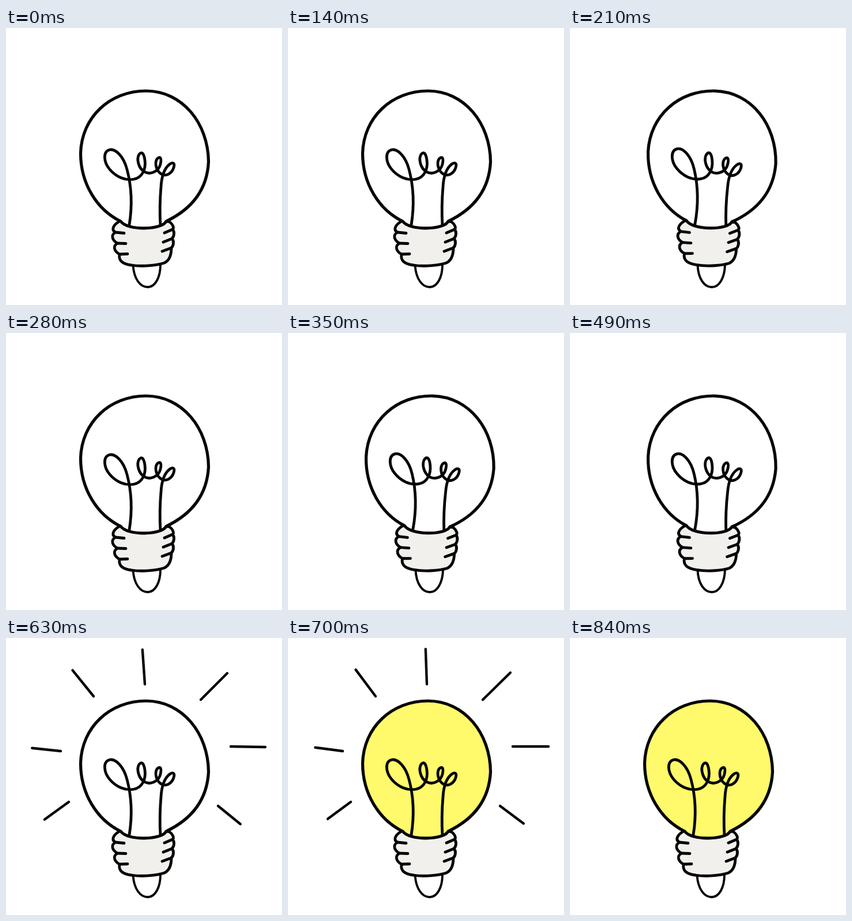
An HTML page for the animation above (1.05 s loop, 479x480 px).

```html
<!DOCTYPE html>
<html lang="en">
<head>
<meta charset="utf-8">
<title>Light bulb</title>
<style>
  html, body { margin: 0; width: 100%; height: 100%; overflow: hidden; background: #fff; }
  svg { display: block; width: 100%; height: 100%; }
  path { fill: none; stroke: #050505; stroke-width: 4.8; stroke-linecap: round; stroke-linejoin: round; }
  #glass { stroke-width: 5.2; }
  #base { fill: #f1f0ec; }
  #tip { stroke-width: 3.9; }
  #rays { stroke-width: 4.4; }
</style>
</head>
<body>
<svg viewBox="0 0 479 480">
  <g id="bulb">
    <path id="tip" d="M220.5 411C222 435 233 449 246 449S268 432 268 410"/>
    <path id="glass"/>
    <path id="filament" d="M214 341C219 310 218 275 210 245C204 222 190 209 180 211C168 214 169 232 180 245S207 265 222 262S243 244 241 229S234 215 231 219C226 227 230 243 240 249S265 249 268 236S266 223 263 226C258 231 259 245 268 252S288 252 291 242S288 233 284 236C275 243 270 258 269 275Q266 310 268 343"/>
    <path id="base"/>
    <path id="notches"/>
  </g>
  <path id="rays"/>
</svg>
<script>
const STEP = 70, LOOP = 1050;
const $ = id => document.getElementById(id);
const setPath = (id, d) => $(id).setAttribute("d", d);
const line = ([x, y], [a, b]) => `M${x} ${y}L${a} ${b}`;

// A rounded bulge from p to q, pushed sideways by d
function bulge([x, y], [a, b], d) {
  const lift = (b - y) / 4;
  return `C${x + d} ${y + lift} ${a + d} ${b - lift} ${a} ${b}`;
}

function buildBulb() {
  const collar = "C272 350 210 352 199 335Z";
  setPath("glass", "M199 335C158 315 129.5 270 129.5 217C131 155 180 109 243 109" +
    "S351 165 351.5 232C349 280 322 314 278 335" + collar);

  const rows = [0, 1, 2];
  const left = rows.map(i => [190 + 3.5 * i, 354 + 19 * i]);
  const right = rows.map(i => [289 - i, 349 + 16 * i]);
  const leftTop = [197, 335], rightTop = [284, 336];

  let d = "M" + leftTop;
  rows.forEach(i => d += bulge(left[i - 1] || leftTop, left[i], -9));
  d += "C195 403 202 409 218 411C238 414 263 411 275 407Q287 401 " + right[2];
  rows.reverse().forEach(i => d += bulge(right[i], right[i - 1] || rightTop, 4));
  setPath("base", d + "L278 335" + collar);

  setPath("notches", rows.map(i =>
    line(left[i], [205 + 3 * i, 355.5 + 18 * i]) +
    line(right[i], [275 - 2 * i, 355 + 16 * i])).join(""));
}

// Each ray: inner end, direction in degrees, length
const rays = [
  [241, 80, -94, 60], [152, 101, -129, 58], [338, 107, -45, 65], [95, 196, 186, 50],
  [390, 188, 1, 60], [109, 284, 144, 52], [368, 291, 39, 50]
];

// push moves a ray outward, scale sets its length, lean shifts its outer end
const burst = ({ push = 0, scale = 1, lean = 0 }) => rays.map(([x, y, deg, length]) => {
  const a = deg * Math.PI / 180;
  const at = r => [x + r * Math.cos(a), y + r * Math.sin(a)];
  const [u, v] = at(push + length * scale);
  return line(at(push), [u + lean, v - lean / 2]);
}).join("");

const bursts = {
  8: { scale: 0.87 },
  9: {},
  10: { lean: 2 },
  11: { push: 13, lean: 2 }
};

function draw(time) {
  const step = Math.min(12, Math.floor(time % LOOP / STEP));
  const shaking = step < 8 && step % 2 === 1;
  $("bulb").setAttribute("transform", shaking ? "rotate(1.5 245 448)" : "");
  $("glass").style.fill = step >= 10 ? "#fffa6b" : "#fff";
  setPath("rays", bursts[step] ? burst(bursts[step]) : "");
}

buildBulb();
const start = performance.now();
function tick() {
  draw(performance.now() - start);
  requestAnimationFrame(tick);
}
tick();
</script>
</body>
</html>
```
